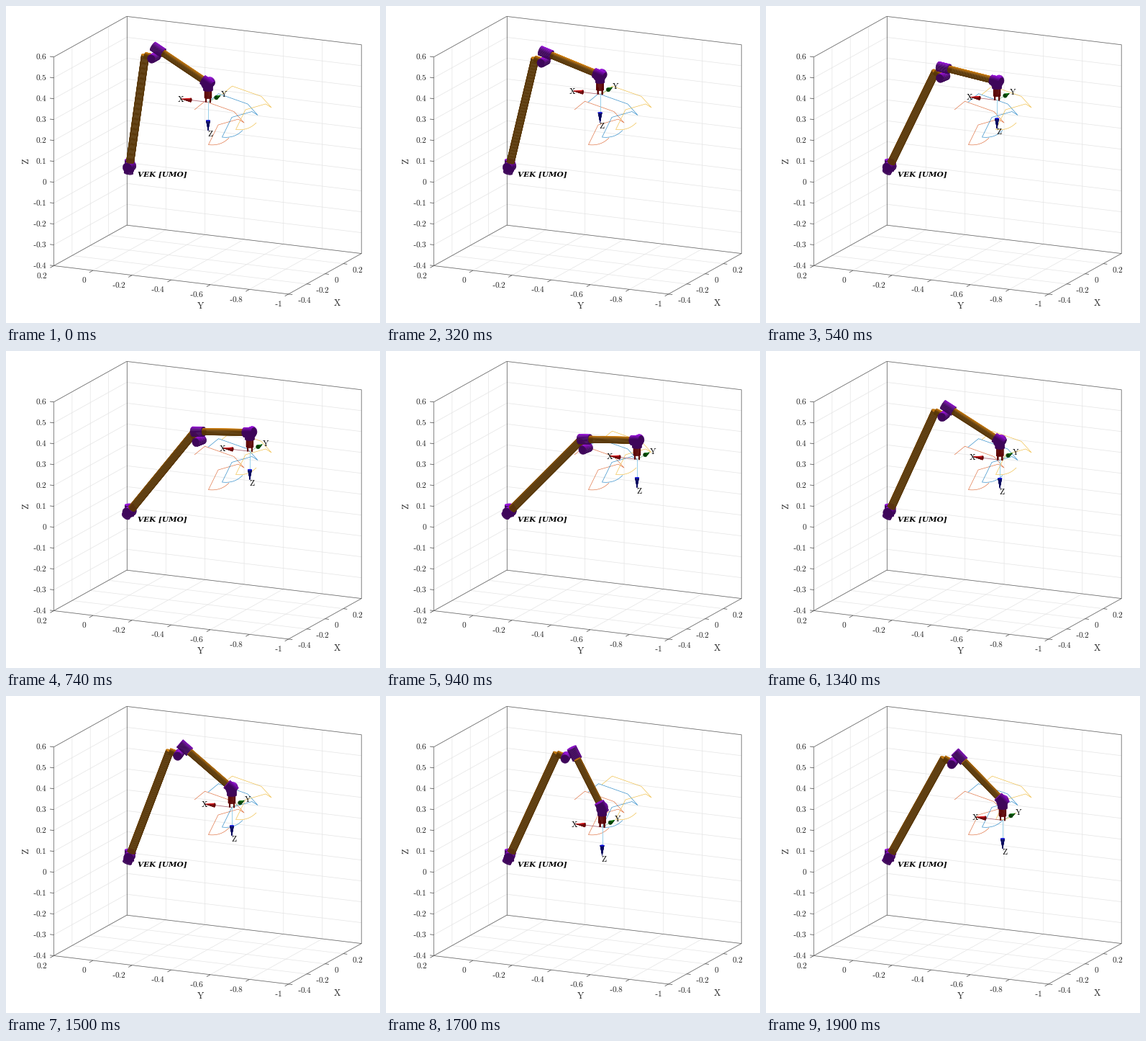
A matplotlib script for the animation above (2000 ms loop, 520 by 440 pixels).

```python
import numpy as np
import matplotlib.pyplot as plt
from matplotlib.animation import FuncAnimation
from matplotlib.collections import LineCollection, PolyCollection

plt.rcParams["mathtext.fontset"] = "cm"

FRAMES, INTERVAL = 100, 20
HOLD, STEPS = 4, 91

# Orthographic camera: azimuth -65, elevation 15
SCALE = 300.0
ORIGIN = np.array([171.6, 223.0])
CA, SA = np.cos(np.radians(65)), np.sin(np.radians(65))
CE, SE = np.cos(np.radians(15)), np.sin(np.radians(15))
RIGHT = np.array([CA, -SA, 0])
UP = np.array([SA * SE, CA * SE, CE])
VIEW = np.array([-SA * CE, -CA * CE, SE])
LIGHT = np.array([0.35, 0.1, 0.93])
LIGHT = LIGHT / np.linalg.norm(LIGHT)

GOLD = (0.82, 0.5, 0.06)
PURPLE = (0.58, 0.06, 0.84)
MAROON = (0.85, 0.06, 0.06)
RED, GREEN, NAVY = (0.95, 0.03, 0.05), (0.03, 0.6, 0.05), (0.03, 0.03, 0.85)

# Arm dimensions in metres
UPPER, FORE, OFFSET, TOOL = 0.55, 0.288, 0.045, 0.091


def project(p):
    p = np.asarray(p, float)
    return np.stack([ORIGIN[0] + SCALE * (p @ RIGHT),
                     ORIGIN[1] - SCALE * (p @ UP)], axis=-1)


def lift(sx, sy, x):
    """Space point that appears at (sx, sy) and has the given x."""
    y = ((sx - ORIGIN[0]) / SCALE - x * RIGHT[0]) / RIGHT[1]
    z = ((ORIGIN[1] - sy) / SCALE - x * UP[0] - y * UP[1]) / UP[2]
    return np.array([x, y, z])


# Tool path: corners, then a curved stroke
CORNERS = np.array([lift(*c) for c in (
    (281, 133.5, 0), (295.5, 121.7, 0), (336, 136, -0.095),
    (350, 151.5, -0.085), (342, 146.5, -0.04), (314, 154.5, 0.12),
    (300.5, 182, 0.13))])
CORNER_STEPS = (0, 11, 30, 44, 51, 71, 81)
BEND, END = lift(318, 184, 0.13), lift(329, 172.5, 0.13)


def stroke(u):
    return (1 - u) ** 2 * CORNERS[-1] + 2 * u * (1 - u) * BEND + u * u * END


def tool_at(step):
    if step > CORNER_STEPS[-1]:
        return stroke((step - CORNER_STEPS[-1]) / (STEPS - CORNER_STEPS[-1]))
    return np.array([np.interp(step, CORNER_STEPS, c) for c in CORNERS.T])


def shade(color, normal):
    lit = max(0.0, normal @ LIGHT)
    rgb = np.array(color) * (0.42 + 0.58 * lit + 0.15 * lit ** 12)
    return tuple(np.clip(rgb, 0, 1))


def tube(faces, p, q, r0, color, r1=None, sides=32):
    """Append the visible faces of a cylinder or cone from p to q."""
    r1 = r0 if r1 is None else r1
    p, q = np.asarray(p, float), np.asarray(q, float)
    length = np.linalg.norm(q - p)
    axis = (q - p) / length
    helper = np.eye(3)[np.argmin(np.abs(axis))]
    a = np.cross(axis, helper)
    a /= np.linalg.norm(a)
    b = np.cross(axis, a)
    ang = np.linspace(0, 2 * np.pi, sides + 1)
    ring = np.outer(np.cos(ang), a) + np.outer(np.sin(ang), b)
    low, high = project(p + r0 * ring), project(q + r1 * ring)
    for i in range(sides):
        n = (ring[i] + ring[i + 1]) * length / 2 + axis * (r0 - r1)
        n /= np.linalg.norm(n)
        if n @ VIEW > 0:
            faces.append(([low[i], low[i + 1], high[i + 1], high[i]],
                          shade(color, n)))
    for n, rim, r in ((-axis, low, r0), (axis, high, r1)):
        if r > 0 and n @ VIEW > 0:
            faces.append((rim[:-1], shade(color, n)))


def arm_joints(wrist):
    """Planar solution in the vertical plane through base and wrist."""
    rho = np.hypot(wrist[0], wrist[1])
    out = np.array([wrist[0] / rho, wrist[1] / rho, 0])
    side = np.array([-out[1], out[0], 0])
    z_axis = np.array([0, 0, 1.0])
    dist = np.hypot(rho, wrist[2])
    l1, l2 = np.hypot(UPPER, OFFSET), np.hypot(FORE, OFFSET)
    along = (dist ** 2 + l1 ** 2 - l2 ** 2) / (2 * dist)
    height = np.sqrt(max(0, l1 ** 2 - along ** 2))
    reach = np.array([rho, wrist[2]]) / dist
    elbow = along * reach + height * np.array([-reach[1], reach[0]])
    t1 = np.arctan2(elbow[1], elbow[0]) + np.arctan2(OFFSET, UPPER)
    to_wrist = np.array([rho, wrist[2]]) - elbow
    t2 = np.arctan2(to_wrist[1], to_wrist[0]) - np.arctan2(OFFSET, FORE)

    def polar(t):
        return np.cos(t) * out + np.sin(t) * z_axis

    e = elbow[0] * out + elbow[1] * z_axis
    return (side, polar(t1), e, polar(t2),
            e + OFFSET * polar(t2 + np.pi / 2))


def arm_faces(tool):
    faces = []
    z = np.array([0, 0, 1.0])
    wrist = tool + TOOL * z
    side, d1, elbow, d2, start = arm_joints(wrist)
    tip = UPPER * d1

    tube(faces, -0.02 * z, 0.033 * z, 0.021, PURPLE)
    tube(faces, -0.032 * d1, 0.028 * d1, 0.021, PURPLE)
    tube(faces, 0.024 * side, -0.024 * side, 0.023, PURPLE)
    tube(faces, 0.022 * d1, tip, 0.018, GOLD)
    tube(faces, tip - 0.002 * d1, elbow, 0.0145, GOLD)
    tube(faces, elbow + 0.03 * side, elbow - 0.03 * side, 0.02, PURPLE)
    tube(faces, start - 0.03 * d2, start + 0.03 * d2, 0.0225, PURPLE)
    tube(faces, start + 0.03 * d2, wrist - 0.02 * d2, 0.0155, GOLD)

    for s in (-1, 1):
        shift = np.array([0, 0.011 * s, 0])
        tube(faces, tool + 0.03 * z + shift, tool + shift, 0.003, MAROON, sides=8)
    tube(faces, wrist - 0.015 * z, tool + 0.021 * z, 0.0165, MAROON)
    tube(faces, wrist - 0.034 * z, wrist, 0.021, PURPLE)
    tube(faces, wrist + 0.026 * side, wrist - 0.026 * side, 0.023, PURPLE)
    tube(faces, wrist - 0.03 * d2, wrist + 0.022 * d2, 0.0225, PURPLE)

    for d, color in zip(TOOL_AXES, (RED, GREEN, NAVY)):
        tube(faces, tool + 0.088 * d, tool + 0.135 * d, 0.0095, color, 0, 14)
    return faces


TOOL_AXES = np.array([[0, 1.0, 0], [1.0, 0, 0], [0, 0, -1.0]])
LABEL_SHIFT = {"X": (-38, -4.5), "Y": (22, -11.5), "Z": (3, 43.5)}

fig = plt.figure(figsize=(5.2, 4.4), dpi=100, facecolor="white")
ax = fig.add_axes([0, 0, 1, 1])
ax.set_xlim(0, 520)
ax.set_ylim(440, 0)
ax.axis("off")


def write(x, y, s, px, **kw):
    kw = {"ha": "center", "va": "center", "color": "#262626", **kw}
    return ax.text(x, y, s, fontsize=px * 0.72, **kw)


def number(v):
    v = round(v, 1)
    return ("-" if v < 0 else "") + f"${abs(v):g}$"


def lines(segments, color, width, z, alpha=1):
    ax.add_collection(LineCollection([project(s) for s in segments],
                                     colors=[color], linewidths=width,
                                     zorder=z, alpha=alpha))


def draw_axes():
    x0, x1, y0, y1, z0, z1 = -0.4, 0.4, -1.0, 0.2, -0.4, 0.6
    xs = np.linspace(-0.4, 0.2, 4)
    ys = np.linspace(0.2, -1.0, 7)
    zs = np.linspace(-0.4, 0.6, 11)
    grid = []
    for x in xs:
        grid.append([(x, y0, z0), (x, y1, z0), (x, y1, z1)])
    for y in ys:
        grid.append([(x0, y, z0), (x1, y, z0), (x1, y, z1)])
    for z in zs:
        grid.append([(x0, y1, z), (x1, y1, z), (x1, y0, z)])
    lines(grid, "#e4e4e4", 0.5, 1)

    box = [[(x0, y1, z0), (x0, y1, z1), (x1, y1, z1), (x1, y0, z1),
            (x1, y0, z0), (x0, y0, z0), (x0, y1, z0), (x1, y1, z0),
            (x1, y0, z0)],
           [(x1, y1, z0), (x1, y1, z1)]]
    lines(box, "#6a6a6a", 0.55, 2)

    ticks = []
    for x in xs:
        ticks.append([(x, y0, z0), (x, y0 - 0.02, z0)])
        px, py = project((x, y0, z0))
        write(px + 12.3, py + 8, number(x), 11.3, ha="left")
    for y in ys:
        ticks.append([(x0, y, z0), (x0 - 0.04, y, z0)])
        px, py = project((x0, y, z0))
        write(px - 8.5, py + 13.2, number(y), 11.3, ha="right")
    for z in zs:
        ticks.append([(x0, y1, z), (x0, y1 + 0.02, z)])
        px, py = project((x0, y1, z))
        write(px - 9.5, py - 0.8, number(z), 11.3, ha="right")
    lines(ticks, "#505050", 0.55, 2)

    write(461, 413, r"$\mathrm{X}$", 12.5)
    write(270.5, 417, r"$\mathrm{Y}$", 12.5)
    write(28, 215.5, r"$\mathrm{Z}$", 12.5, rotation=90)


def draw_paths():
    curve = np.array([stroke(u) for u in np.linspace(0, 1, 20)])
    path = np.vstack([CORNERS, curve])
    for dx, color in ((-0.15, "#d95319"), (0, "#0072bd"), (0.15, "#edb120")):
        lines([path + (dx, 0, 0)], color, 0.45, 3, 0.85)


draw_axes()
draw_paths()
write(183, 233.8, "VEK [UMO]", 10.5, ha="left", color="black",
      family="DejaVu Serif", style="italic", weight="bold")

body = PolyCollection([], linewidths=0.3, zorder=5)
ax.add_collection(body)
rods = LineCollection([], colors=["#b06a78", "#8fc79a", "#86c8e6"],
                      linewidths=0.6, zorder=4)
ax.add_collection(rods)
marks = {k: write(0, 0, rf"$\mathrm{{{k}}}$", 11.5, color="black", zorder=6)
         for k in LABEL_SHIFT}


def update(k):
    tool = tool_at(np.clip(k - HOLD, 0, STEPS))
    faces = arm_faces(tool)
    body.set_verts([f[0] for f in faces])
    colors = [f[1] for f in faces]
    body.set_facecolor(colors)
    body.set_edgecolor(colors)
    rods.set_segments([project([tool, tool + 0.1 * d]) for d in TOOL_AXES])
    px, py = project(tool)
    for name, (dx, dy) in LABEL_SHIFT.items():
        marks[name].set_position((px + dx, py + dy))
    return [body, rods, *marks.values()]


anim = FuncAnimation(fig, update, frames=FRAMES, interval=INTERVAL,
                     init_func=lambda: update(0), repeat=True,
                     repeat_delay=0, blit=False)
plt.show()
```
